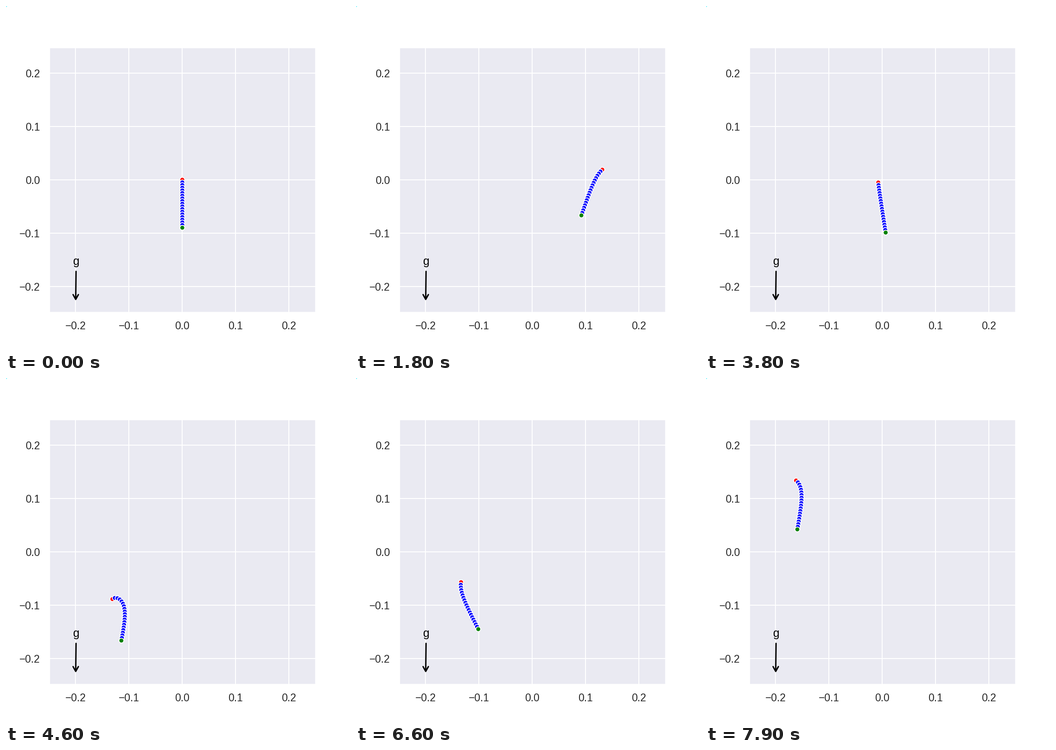
Write a matplotlib script that moves like this. It is 748 px wide and 748 px high and loops after 8000 ms.

```python
import numpy as np
import matplotlib.pyplot as plt
from matplotlib.animation import FuncAnimation
from matplotlib.lines import Line2D
from matplotlib.patches import Polygon

SIZE, DPI = 748, 88
STEPS = 12                 # frames per throw
LINKS, LINK = 19, 0.005    # rope links and their length
BEND = 0.2                 # share of the rope that follows the hand's turn
SCALE = 1159.4             # pixels per data unit

# hand travel in pixels (right, up) and hand turn in degrees
THROWS = [(136, 18, 15), (223, 32, -66), (70, 82, 270), (-152, -103, 115),
          (196, -50, 187), (-227, -97, -8), (-224, 185, 54)]


def px(n):
    """Pixels to points."""
    return n * 72 / DPI


def min_jerk(u):
    u = np.clip(u, 0, 1)
    return u ** 3 * (10 - 15 * u + 6 * u * u)


def lean(dx, dy, turn, u):
    """Hanging angle: the rope trails the hand, then swings past it."""
    trail = -0.135 * dx * (1 - dy / 400)
    swing = 0.25 * dx + 0.002 * turn * abs(turn)
    return trail * np.sin(np.pi * u) ** 2 + swing * min_jerk((u - 0.45) / 0.55)


def rope(frame):
    dx, dy, turn = THROWS[frame // STEPS]
    u = min(frame % STEPS / 10, 1)
    reach = min_jerk(u)
    body = lean(dx, dy, turn, u)
    s = np.linspace(0, 1, LINKS)
    angle = np.radians(body + (turn * reach - body) * np.exp(-s / BEND))
    length = np.full(LINKS, LINK)
    if u == 0:
        length[-1] = 0     # the rope starts one link short
    links = np.column_stack([np.sin(angle), -np.cos(angle)]) * length[:, None]
    hand = np.array([dx, dy]) * reach / SCALE
    return np.vstack([hand, hand + np.cumsum(links, axis=0)])


plt.rcParams["font.family"] = "Liberation Sans"
fig = plt.figure(figsize=(SIZE / DPI, SIZE / DPI), dpi=DPI, facecolor="white")

ax = fig.add_axes([0.125, 0.11, 0.775, 0.77], facecolor="#EAEAF2")
half = 0.25 * 0.77 / 0.775
ax.set(xlim=(-0.25, 0.25), ylim=(-half, half))
ticks = np.arange(-2, 3) / 10
names = [f"{t:.1f}".replace("-", "\u2212") for t in ticks]
ax.set_xticks(ticks, names)
ax.set_yticks(ticks, names)
ax.tick_params(length=0, labelsize=px(22.9), labelcolor="0.15")
ax.tick_params(axis="x", pad=px(18.8))
ax.tick_params(axis="y", pad=px(19.8))
ax.set_axisbelow(True)
ax.grid(color="white", linewidth=px(2.08))
for spine in ax.spines.values():
    spine.set(edgecolor="white", linewidth=px(2.6))

# fixed marks, placed in pixels from the top left
top = fig.add_axes([0, 0, 1, 1])
top.set(xlim=(0, SIZE), ylim=(SIZE, 0))
top.axis("off")
top.text(153, 563, "g", fontsize=px(25), ha="center", va="baseline")
for xs, ys in [((152.3, 151.6), (577, 637)),
               ((145.8, 151.6, 157.4), (627.5, 638, 627.5))]:
    top.add_line(Line2D(xs, ys, color="black", linewidth=px(3),
                        solid_capstyle="round", solid_joinstyle="round"))
top.add_patch(Polygon([(0, 0), (3, 0), (0, 3)], color="#7FF4FF", linewidth=0))

colors = ["red"] + ["blue"] * (LINKS - 1) + ["green"]
beads = ax.scatter(*rope(0).T, s=px(10.4) ** 2, c=colors,
                   edgecolors="white", linewidths=px(1.7), zorder=2)


def update(frame):
    beads.set_offsets(rope(frame))
    return (beads,)


anim = FuncAnimation(fig, update, frames=80, interval=100, repeat=True,
                     repeat_delay=0, blit=False)
plt.show()
```
